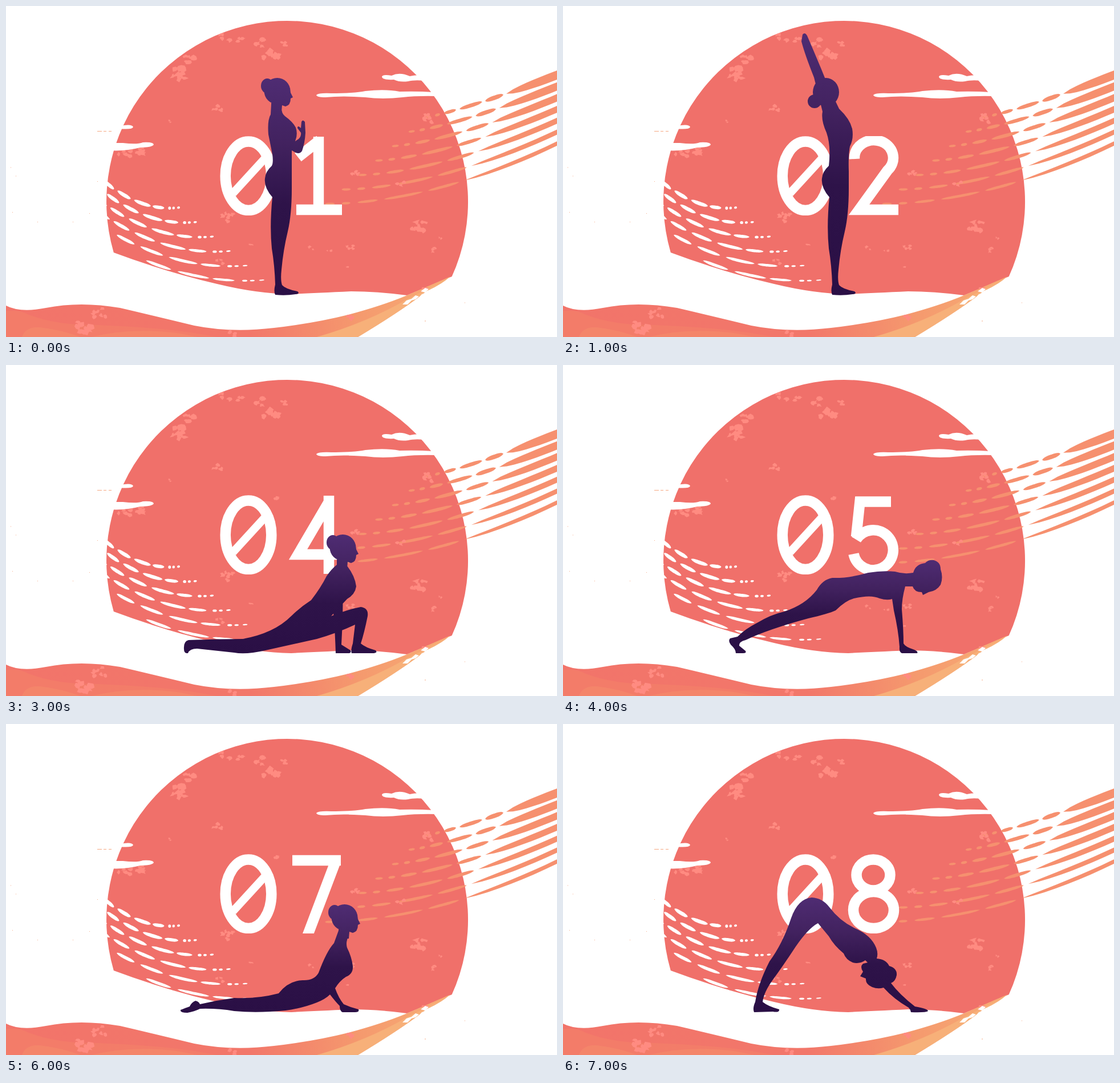
An HTML page that plays this animation: 966 px wide and 580 px high, repeating every 8 s.

```html
<!DOCTYPE html>
<html lang="en">
<head>
<meta charset="utf-8">
<title>Sun salutation</title>
<style>
  html, body { margin: 0; width: 100%; height: 100%; overflow: hidden; background: #fff; }
  svg { display: block; width: 966px; height: 580px; }
</style>
</head>
<body>
<svg id="stage" viewBox="0 0 966 580" role="img">
  <defs>
    <linearGradient id="skin" x2="0" y2="1">
      <stop stop-color="#4f2c73"/><stop offset=".3" stop-color="#42225f"/>
      <stop offset=".58" stop-color="#2e1349"/><stop offset="1" stop-color="#2a0f45"/>
    </linearGradient>
    <linearGradient id="sand" gradientUnits="userSpaceOnUse" x2="779">
      <stop stop-color="#f2746a"/><stop offset=".55" stop-color="#f2776a"/>
      <stop offset=".8" stop-color="#f59a6e"/><stop offset="1" stop-color="#f7ad75"/>
    </linearGradient>
    <path id="sun" d="M188.800 432A317 317 0 1 1 781.700 474L703 507Q650 500 605 500Q540 503 500 505Q440 504 370 487Q280 466 188.800 432Z"/>
    <path id="wave" d="M0 525Q25 538 70 529Q130 517 200 529Q260 543 330 560Q395 573 470 564Q540 556 600 541Q660 525 703 507L779 474Q762 489 738 499Q700 530 617 580H0Z"/>
    <clipPath id="ground"><use href="#sun"/><use href="#wave"/></clipPath>
    <clipPath id="line"><path d="M370 228H600V367H370Z"/></clipPath>
  </defs>
  <use href="#sun" fill="#f0706a"/>
  <use href="#wave" fill="url(#sand)"/>
  <path fill="#f58369" d="M0 534Q25 532 40 541Q90 560 160 559Q260 563 330 573L370 580H0Z" opacity=".5"/>
  <path fill="#f68c6b" d="M28 580Q34 562 58 563Q100 568 130 580ZM150 580Q220 563 300 573L335 580Z" opacity=".6"/>
  <path fill="#f7b079" d="M545 580Q632 555 703 514Q730 500 771 480Q745 497 738 499Q700 530 617 580Z"/>
  <path id="stripes" fill="#f6906f"/>
  <path id="grain" fill="#ff8b81" clip-path="url(#ground)"/>
  <g fill="#fff">
    <path id="strokes"/>
    <path d="M200 210Q221 206 223 212Q222 217 198 215ZM182 240H205Q230 243 240 239Q258 238 259 243Q256 248 235 248Q210 255 180 253Z"/>
    <path d="M659 124Q660 119 676 122Q690 115 708 123Q720 120 730 122L736 131Q715 129 705 132Q690 134 680 129Q660 130 659 124Z"/>
    <path d="M544 156Q548 152 570 153Q610 153 630 149Q665 145 690 150Q720 149 750 151L758 158Q720 157 695 160Q660 164 630 160Q590 157 560 160Q545 160 544 156Z"/>
    <path d="M695 523L702 516 711 513 718 507 724 509 718 514 711 516 704 523ZM727 500L735 494 741 496 735 502ZM720 515L729 505 739 502 724 518Z"/>
  </g>
  <path stroke="#f6a983" d="M160 219.500h8m3 0h5m4 0h5M8 283h1m8 15h1M11 361.500h1m43 17h1m61 0h1m42-71h1m-15 56h1M804 520h1m-71 32h2"/>
  <g fill="none" stroke="#fff" stroke-width="18.500" clip-path="url(#line)">
    <ellipse cx="425" cy="297.700" rx="40.300" ry="60.300"/>
    <path stroke-width="14" d="M398 328L453 268"/>
    <path id="digit"/>
  </g>
  <path id="figure" fill="url(#skin)"/>
</svg>
<script>
const $ = id => document.getElementById(id);
const draw = (id, d) => $(id).setAttribute("d", d);

// Tapered brush mark of width w along y = f(x) from a to b
function mark(f, a, b, w) {
  const top = [], bottom = [];
  for (let i = 0; i <= 16; i++) {
    const s = i / 16, x = a + (b - a) * s;
    const h = w / 2 * (1 - Math.abs(2 * s - 1) ** 3) ** 0.7;
    top.push(`${x.toFixed(1)} ${(f(x) - h).toFixed(1)}`);
    bottom.unshift(`${x.toFixed(1)} ${(f(x) + h).toFixed(1)}`);
  }
  return `M${[...top, ...bottom].join("L")}Z`;
}

function whiteStrokes() {
  const spans = [[0, 9], [16, 24], [28, 37], [49, 86], [91, 144], [154, 196], [206, 239], [246, 285]];
  let d = "";
  for (let row = 0; row < 6; row++) {
    const x0 = 305 + 29.6 * row, y0 = 353 + 25.4 * row, k = 0.56 + 0.1 * row;
    const f = x => {
      const u = (x0 - x) / k;
      return y0 + (0.85 + 0.03 * row) * (0.085 * u - 0.00132 * u * u);
    };
    spans.slice(0, 11 - row).forEach(([a, b], i) =>
      d += mark(f, x0 - b * k, x0 - a * k, Math.min(8, 4 + i * 0.7) - row * 0.4));
  }
  return d;
}

function peachStripes() {
  const spans = [[0, 10], [17, 26], [33, 54], [60, 100], [105, 137], [142, 330]];
  let d = "";
  for (let row = 0; row < 7; row++) {
    const x0 = 735 - 29.3 * row, y0 = 195 + 25.3 * row;
    const f = x => y0 - (74 + 5.3 * row) * (Math.max(0, x - x0) / (966 - x0)) ** (1.2 + 0.11 * row);
    const k = 1 + 0.12 * row;
    spans.forEach(([a, b], i) =>
      d += mark(f, x0 + a * k, x0 + b * k, i < 5 ? 4 + i * (1 - row * 0.13) : 16 - 1.4 * row));
  }
  return d;
}

// Worn paint: seeded jagged flakes around x, y within radius r
function flakes() {
  let seed = 7, d = "";
  const rnd = () => (seed = seed * 16807 % 2147483647) / 2147483647;
  const spots = [
    [466, 82, 17], [447, 64, 12], [410, 60, 9], [385, 54, 12], [486, 67, 7], [298, 118, 19], [325, 93, 13],
    [371, 179, 11], [287, 202, 4], [471, 230, 8], [208, 254, 14], [238, 256, 13], [742, 197, 11], [691, 313, 9],
    [612, 294, 9], [389, 369, 13], [428, 417, 5], [375, 448, 8], [535, 425, 6], [566, 427, 5], [603, 424, 8],
    [601, 457, 4], [723, 384, 16], [748, 427, 7], [762, 407, 4], [164, 537, 13], [140, 563, 19], [395, 575, 10],
    [602, 543, 11], [733, 496, 7]
  ];
  for (const [x, y, r] of spots) {
    const count = Math.ceil(r / 2);
    for (let n = 0; n < count; n++) {
      const cx = x + (rnd() * 2 - 1) * r * 0.8, cy = y + (rnd() * 2 - 1) * r * 0.6, size = r * 0.35 + 1;
      const points = [];
      for (let i = 0; i < 8; i++) {
        const q = size * (0.3 + rnd() * 0.9);
        points.push(`${(cx + Math.cos(i * 0.785) * q).toFixed(1)} ${(cy + Math.sin(i * 0.785) * q * 0.75).toFixed(1)}`);
      }
      d += `M${points.join("L")}Z`;
    }
  }
  return d;
}

const oval = (x, y, rx, ry) => `M${x - rx} ${y}a${rx} ${ry} 0 1 1 ${2 * rx} 0a${rx} ${ry} 0 1 1 ${-2 * rx} 0z`;
// Profile facing right: skull, bun, then face and neck
const head = (x, y) => oval(x + 9.5, y + 20, 23, 23) + oval(x - 8, y + 11, 11, 13) +
  `M${x + 32} ${y + 15}l1 8 4 8-4 2q0 12-9 14l-6-2-1 12-18-2v-14z`;
const legs = "L501 320Q501 365 494 395Q486 428 483 462Q481 480 484 489Q490 496 511 500Q516 504 508 505Q490 508 472 506Q469 500 472 488Q471 455 466 425Q462 385 467 335Q452 318 454 302Q455 290 466 280";

const poses = [
  // Prayer
  head(466, 129) + "M465 172L483 174Q482 188 489 193Q503 203 508 213Q512 224 507 237L513 233Q518 228 517 222L511 214Q511 208 517 214L518 203Q520 198 524 203L525 222Q524 240 519 254Q515 260 508 257L501 253" + legs + "Q469 274 467 260L460 225Q458 200 464 190Z",
  // Raised arms
  oval(461, 151, 23, 25) + oval(441, 167, 12, 12) + "M420 50Q424 45 428 52L440 80Q452 108 464 138L484 180Q503 198 507 215Q510 232 503 246Q500 262 501 290" + legs + "Q470 245 462 222Q452 200 455 185L440 125Q424 85 418 62Z",
  // Forward fold
  "M482 282Q508 281 522 305Q540 335 544 362Q545 380 541 392V404Q550 408 554 420Q563 428 561 440Q556 452 544 450Q528 458 516 447Q508 440 510 428Q498 437 494 446Q485 465 484 482Q486 492 500 496Q513 500 512 504Q505 507 471 505Q469 500 472 488Q470 440 466 420Q466 380 460 350Q450 325 451 312Q455 285 482 282ZM493 324Q492 380 490 400L486 425Q508 404 508 388Q498 385 493 374Q490 360 496 342Z",
  // Lunge
  head(581, 300) + "M580 350L598 352Q612 370 614 388Q612 402 598 410L570 440Q600 428 622 424Q636 426 634 440Q628 470 622 488Q630 495 648 500Q652 504 645 505H606Q604 500 608 488L612 455Q580 470 545 480Q500 490 455 500Q420 508 400 504L335 497Q322 497 319 505Q312 506 312 498Q311 484 320 482Q380 480 415 480Q470 470 500 440Q515 425 535 412Q552 390 562 370Q570 358 580 350ZM576 365L590 368Q592 430 588 490L604 500Q606 505 600 505H578Q576 440 570 400Z",
  // Plank
  "M614 364Q618 349 635 347Q640 341 650 342Q662 345 662 358Q667 372 662 385Q655 396 641 398L631 403 629 398Q616 398 613 388H600Q594 410 594 428Q597 465 597 488Q600 494 616 499Q623 502 621 505H594Q589 503 590 494Q588 465 580 430L577 410Q568 413 555 409Q540 402 510 409Q495 413 478 430Q465 436 430 444Q360 463 320 482Q308 485 309 492L320 501Q322 505 316 505H303Q303 498 294 490Q289 483 293 479L306 476Q320 462 340 452Q365 437 388 432Q425 420 445 394Q455 376 472 373Q500 374 535 364Q560 360 582 362Q598 367 614 364Z",
  // Chest to floor
  "M489 407Q507 408 520 425Q532 440 548 444Q575 448 592 456Q602 462 605 470Q603 452 612 444Q612 430 625 428Q640 430 641 440Q655 448 656 462Q655 474 646 482L644 489 638 486Q636 493 628 492Q621 492 620 488H590Q588 492 590 496L608 502Q612 504 608 506L578 504Q560 504 535 494Q520 488 508 472Q495 458 485 456Q455 472 425 497Q415 506 405 504Q360 496 318 487Q309 489 308 504Q304 508 301 500Q298 494 301 490Q305 484 306 477Q310 469 319 474Q320 478 340 477Q380 477 412 481Q425 465 440 445Q462 412 489 407Z",
  // Cobra
  head(584, 319) + "M583 362L601 371Q595 382 598 392Q606 408 608 424Q609 438 596 443Q585 450 577 463Q583 480 592 491Q605 497 618 500Q620 505 612 505H590Q585 503 585 494Q578 487 568 474Q560 482 545 488Q520 498 490 502Q440 507 400 503Q370 498 340 499Q330 504 318 506Q305 506 306 501Q316 497 322 495Q325 488 332 485Q338 486 340 491Q370 484 400 480Q440 482 478 472Q495 450 520 449Q540 450 548 436Q562 398 575 384Z",
  // Downward dog
  "M436 304Q455 305 467 321Q485 345 512 358Q540 370 549 392Q553 402 550 411Q566 412 572 424Q586 428 585 440Q583 451 575 454Q590 474 617 495Q640 499 640 503Q636 506 610 505Q609 500 606 497Q580 482 562 462Q552 465 542 461Q530 456 531 446L521 442 526 434Q520 425 526 420L534 418 530 414Q520 421 508 418Q496 413 492 402Q475 388 466 372L447 349Q430 358 408 390Q385 425 368 448Q352 470 350 487Q360 495 379 500Q380 506 368 504L335 505Q332 498 337 487Q342 455 362 416Q385 385 400 340Q412 306 436 304Z"
];

const digits = [
  "M548 229V366M509 357H589M550 235L512 265",
  "M511 268A34 31 0 1 1 569 288L519 357H588",
  "M502 239H585M577 243L527 291M529 293A35 35 0 1 1 510 332",
  "M566 366V229M566 240L512 332H590",
  "M575 239.500H520.500L514 301M514 306A35 35 0 1 1 509.500 331",
  oval(544.5, 323, 35.5, 35) + "M565 219L513 308",
  "M502 239H587M577 243L525 380",
  oval(544, 264.5, 29.5, 27) + oval(544.5, 326, 35.5, 32)
];

draw("strokes", whiteStrokes());
draw("stripes", peachStripes());
draw("grain", flakes());

let shown = -1;
function tick() {
  const step = Math.floor(performance.now() / 1000) % poses.length;
  if (step !== shown) {
    shown = step;
    draw("figure", poses[step]);
    draw("digit", digits[step]);
    $("stage").setAttribute("aria-label", `0${step + 1}`);
  }
  requestAnimationFrame(tick);
}
tick();
</script>
</body>
</html>
```
